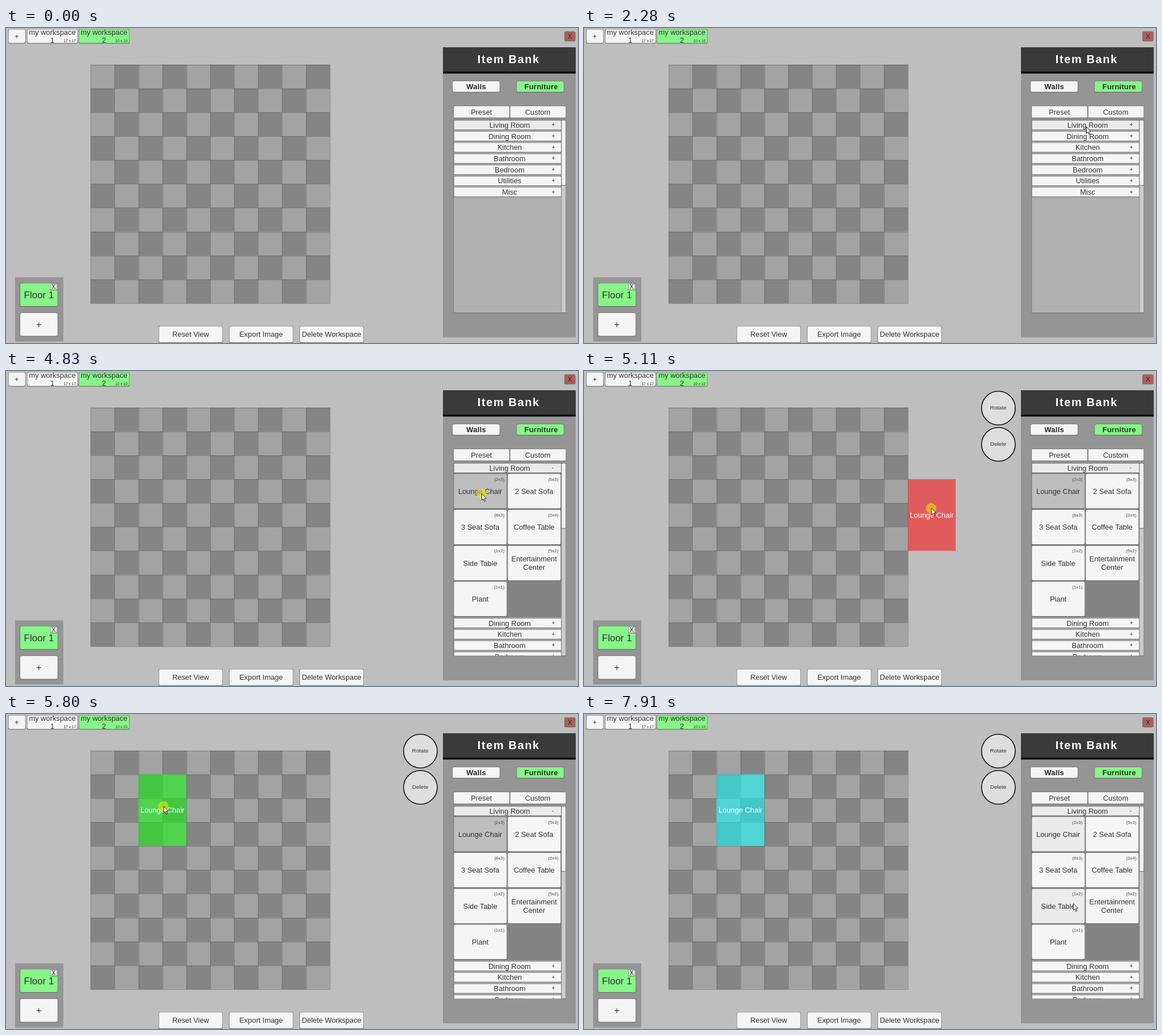
An HTML page with a canvas that plays this animation: 1008 px wide and 556 px high, repeating every 8 s.

```html
<!DOCTYPE html>
<html lang="en">
<head>
<meta charset="utf-8">
<title>Room planner</title>
<style>
html, body { margin: 0; width: 100%; height: 100%; overflow: hidden; background: #bebebe; }
canvas { display: block; }
</style>
</head>
<body>
<canvas id="stage" width="1008" height="556"></canvas>
<script>
const ctx = document.getElementById('stage').getContext('2d');
const LOOP = 8000;
const GRID = { x: 149.2, y: 64.5, cell: 42.15, n: 10 };
const WHITE = '#f5f5f5', HOVER = '#ebebeb', GREEN = '#87f587', INK = '#323232';
const ROOMS = ['Living Room', 'Dining Room', 'Kitchen', 'Bathroom', 'Bedroom', 'Utilities', 'Misc'];
const ITEMS = [
  ['Lounge Chair', '(2x3)'], ['2 Seat Sofa', '(5x3)'], ['3 Seat Sofa', '(8x3)'],
  ['Coffee Table', '(2x4)'], ['Side Table', '(1x2)'], ['Entertainment Center', '(5x2)'], ['Plant', '(1x1)']
];

const both = p => p * p * (3 - 2 * p);
const out = p => 1 - (1 - p) * (1 - p);
const into = p => p * p;

// Pointer moves: start, end, steps, target, ease, optional curve control
const START = [1008, 556];
const MOVES = [
  [70, 560, 8, [546, 328], both],
  [1290, 2070, 12, [876, 180], both, [809, 258]],
  [2140, 2280, 3, [885, 174], out],
  [3400, 3760, 6, [829, 212], both],
  [4830, 4830, 1, [838, 216], both],
  [4900, 4970, 2, [735, 238], into],
  [5040, 5590, 9, [322, 196], out, [612, 259]],
  [5660, 5940, 5, [269, 156], out],
  [6470, 6950, 7, [762, 255], both],
  [7490, 7910, 7, [862, 334], both]
];

function pointerAt(t) {
  let from = START;
  for (const [t0, t1, steps, to, ease, ctrl] of MOVES) {
    if (t < t0) break;
    const dt = steps > 1 ? (t1 - t0) / (steps - 1) : 1;
    const k = Math.min(steps, Math.floor((t - t0 + 14) / dt) + 1);
    const e = ease(Math.min(1, k / steps));
    const a = from;
    from = to.map((b, i) => {
      const c = ctrl ? ctrl[i] : (a[i] + b) / 2;
      return (1 - e) * (1 - e) * a[i] + 2 * e * (1 - e) * c + e * e * b;
    });
    if (e < 1) break;
  }
  return from;
}

// Value of the last [time, value] pair already reached
function stateAt(t, pairs) {
  let v = pairs[0][1];
  for (const [at, value] of pairs) if (t >= at) v = value;
  return v;
}

function rect(x, y, w, h, fill) {
  ctx.fillStyle = fill;
  ctx.fillRect(x, y, w, h);
}

function round(x, y, w, h, r, fill) {
  ctx.fillStyle = fill;
  ctx.beginPath();
  ctx.roundRect(x, y, w, h, r);
  ctx.fill();
}

function text(s, x, y, size = 12.9, color = INK, align = 'center', bold = false) {
  ctx.font = `${bold ? 'bold ' : ''}${size}px "Liberation Sans", Arial, sans-serif`;
  ctx.textAlign = align;
  ctx.fillStyle = color;
  ctx.fillText(s, x, y + size * 0.355);
}

function spaced(s, x, y, size, color, gap) {
  ctx.letterSpacing = gap + 'px';
  text(s, x + gap / 2, y, size, color, 'center', true);
  ctx.letterSpacing = '0px';
}

function button(x, y, w, h, fill = WHITE, r = 2.5) {
  round(x, y, w, h, r, '#626262');
  round(x + 0.6, y + 0.6, w - 1.2, h - 1.6, r, fill);
}

function drawGrid() {
  const { x, y, cell, n } = GRID;
  for (let r = 0; r < n; r++) {
    for (let c = 0; c < n; c++) {
      rect(x + c * cell, y + r * cell, cell + 0.3, cell + 0.3, (r + c) % 2 ? '#858585' : '#a3a3a3');
    }
  }
  ctx.strokeStyle = 'rgba(0,0,0,.2)';
  ctx.lineWidth = 1;
  ctx.beginPath();
  for (let i = 0; i <= n; i++) {
    const px = Math.round(x + i * cell) + 0.5, py = Math.round(y + i * cell) + 0.5;
    ctx.moveTo(px, y);
    ctx.lineTo(px, y + n * cell);
    ctx.moveTo(x, py);
    ctx.lineTo(x + n * cell, py);
  }
  ctx.stroke();
}

function drawChair(t, [px, py]) {
  const { x, y, cell, n } = GRID;
  const placed = t >= 6400;
  const col = placed ? 2 : Math.round((px - x) / cell - 1);
  const row = placed ? 1 : Math.round((py - y) / cell - 1.5);
  const valid = col >= 0 && row >= 0 && col + 2 <= n && row + 3 <= n;
  const tint = placed ? '19,249,250' : valid ? '19,249,19' : '249,19,19';
  const left = x + col * cell, top = y + row * cell;
  rect(left, top, 2 * cell, 3 * cell, `rgba(${tint},.57)`);
  text('Lounge Chair', left + cell, top + 1.5 * cell, 12.9, '#fff');
}

function drawTools() {
  [['Rotate', 65.5], ['Delete', 129.5]].forEach(([name, y]) => {
    ctx.beginPath();
    ctx.arc(730.3, y, 29.7, 0, Math.PI * 2);
    ctx.fillStyle = '#dedede';
    ctx.fill();
    ctx.strokeStyle = '#111';
    ctx.lineWidth = 1.6;
    ctx.stroke();
    text(name, 730, y - 0.5, 9.8);
  });
}

function drawFrame() {
  button(4, 2, 30.5, 25.5);
  text('+', 19, 14.5, 12.5);
  [['1', '17 x 17', 37, WHITE], ['2', '10 x 10', 128, GREEN]].forEach(([num, size, x, fill]) => {
    button(x, 2, 89.5, 25.5, fill);
    text('my workspace', x + 44.7, 7.3);
    text(num, x + 44.5, 21.5);
    text(size, x + 86, 22.8, 6.5, INK, 'right');
  });

  button(984, 6, 19.5, 17.5, '#aa6060');
  text('X', 993.7, 14.8, 12, '#4a2020');

  rect(16, 440, 85, 113.5, '#959595');
  button(24.5, 450, 67, 42, GREEN);
  text('Floor 1', 58, 471, 17);
  button(78, 451, 12, 12, WHITE, 1);
  text('X', 84, 457, 12);
  button(24.5, 502.5, 67, 42);
  text('+', 58, 523.5, 16);

  [['Reset View', 269], ['Export Image', 393.2], ['Delete Workspace', 517.3]].forEach(([name, x]) => {
    button(x, 526, 113, 29.7);
    text(name, x + 56.4, 540.7);
  });
}

function drawHeader(name, y, fill, sign) {
  button(789, y, 190, 17.6, fill, 1);
  text(name, 887.5, y + 8.6);
  text(sign, sign === '-' ? 963.2 : 964.5, y + 7.8, 10.5);
}

function drawPanel(t, [px, py]) {
  rect(770, 34, 234, 512, '#959595');
  rect(770, 34, 234, 43, '#3a3a3a');
  rect(770, 77, 234, 3.4, '#060606');
  spaced('Item Bank', 885, 55, 20, '#fff', 1.6);
  button(786.5, 93.5, 84, 20.3);
  spaced('Walls', 828.5, 103.7, 13, '#222', 0.25);
  button(899.5, 93.5, 84, 20.3, GREEN);
  spaced('Furniture', 943, 103.7, 13, '#223322', 0.25);
  button(788.5, 137.5, 99, 21.7, WHITE, 1);
  text('Preset', 837.8, 148.3);
  button(888, 137.5, 99, 21.7, WHITE, 1);
  text('Custom', 937, 148.3);

  rect(788.5, 162, 198.5, 341.2, '#6c6c6c');
  rect(789.2, 162.7, 197.2, 339.6, '#b1b1b1');

  ctx.save();
  ctx.beginPath();
  ctx.rect(788.5, 162, 199, 340.6);
  ctx.clip();
  const open = t >= 3080;
  const gap = 19.72;
  const head = stateAt(t, [[0, HOVER], [3010, '#d8d8d8'], [3080, '#cfcfcf'], [3140, HOVER]]);
  if (open) {
    rect(789, 180, 190, 255, '#848484');
    drawItems(t, px, py);
  }
  ROOMS.forEach((name, i) => {
    const y = 162.7 + i * gap + (open && i ? 254 : 0);
    drawHeader(name, y, i ? WHITE : head, open && !i ? '-' : '+');
  });
  ctx.restore();

  rect(978.5, 162.5, 8.3, 340, '#7a7a7a');
  rect(979.2, 163, 7, 339, '#cbcbcb');
  button(978.6, 162.5, 8.2, 116, '#f0f0f0', 1.5);
}

function drawItems(t, px, py) {
  const chair = stateAt(t, [
    [0, WHITE], [4490, '#dcdcdc'], [4560, '#cbcbcb'], [4630, '#bebebe'], [6400, '#d9d9d9'], [6470, HOVER]
  ]);
  ITEMS.forEach(([name, size], i) => {
    const x = 788.7 + (i % 2) * 95, y = 181 + Math.floor(i / 2) * 63.4;
    const over = px > x && px < x + 94 && py > y && py < y + 62;
    const fill = !i && t >= 4490 ? chair : over && t > 3140 ? HOVER : WHITE;
    button(x, y, 94.3, 62.6, fill, 2);
    text(size, x + 89.7, y + 9.7, 8, '#4a4a4a', 'right');
    const lines = name.length > 13 ? name.split(' ') : [name];
    lines.forEach((s, j) => {
      text(s, x + 47, y + 31.2 + (j - (lines.length - 1) / 2) * 14.5);
    });
  });
}

function drawPointer(t, [x, y]) {
  const held = (t >= 3010 && t < 3080) || (t >= 4490 && t < 6400);
  if (held) {
    ctx.fillStyle = 'rgba(240,232,0,.57)';
    ctx.beginPath();
    ctx.arc(x, y + 1, 9.3, 0, Math.PI * 2);
    ctx.fill();
  }
  ctx.save();
  ctx.translate(x, y);
  ctx.beginPath();
  [[0.5, 0.5], [0.5, 12.2], [3.1, 9.8], [5, 14.3], [6.8, 13.5], [4.9, 9.2], [8.4, 9]].forEach(p => ctx.lineTo(...p));
  ctx.closePath();
  ctx.fillStyle = '#fff';
  ctx.fill();
  ctx.strokeStyle = '#111';
  ctx.lineWidth = 0.9;
  ctx.stroke();
  ctx.restore();
}

function draw(t) {
  const pointer = pointerAt(t);
  rect(0, 0, 1008, 556, '#bebebe');
  drawGrid();
  if (t >= 4900) {
    drawChair(t, pointer);
    drawTools();
  }
  drawFrame();
  drawPanel(t, pointer);
  drawPointer(t, pointer);
}

const begin = performance.now();
function tick() {
  draw((performance.now() - begin) % LOOP);
  requestAnimationFrame(tick);
}
tick();
</script>
</body>
</html>
```
